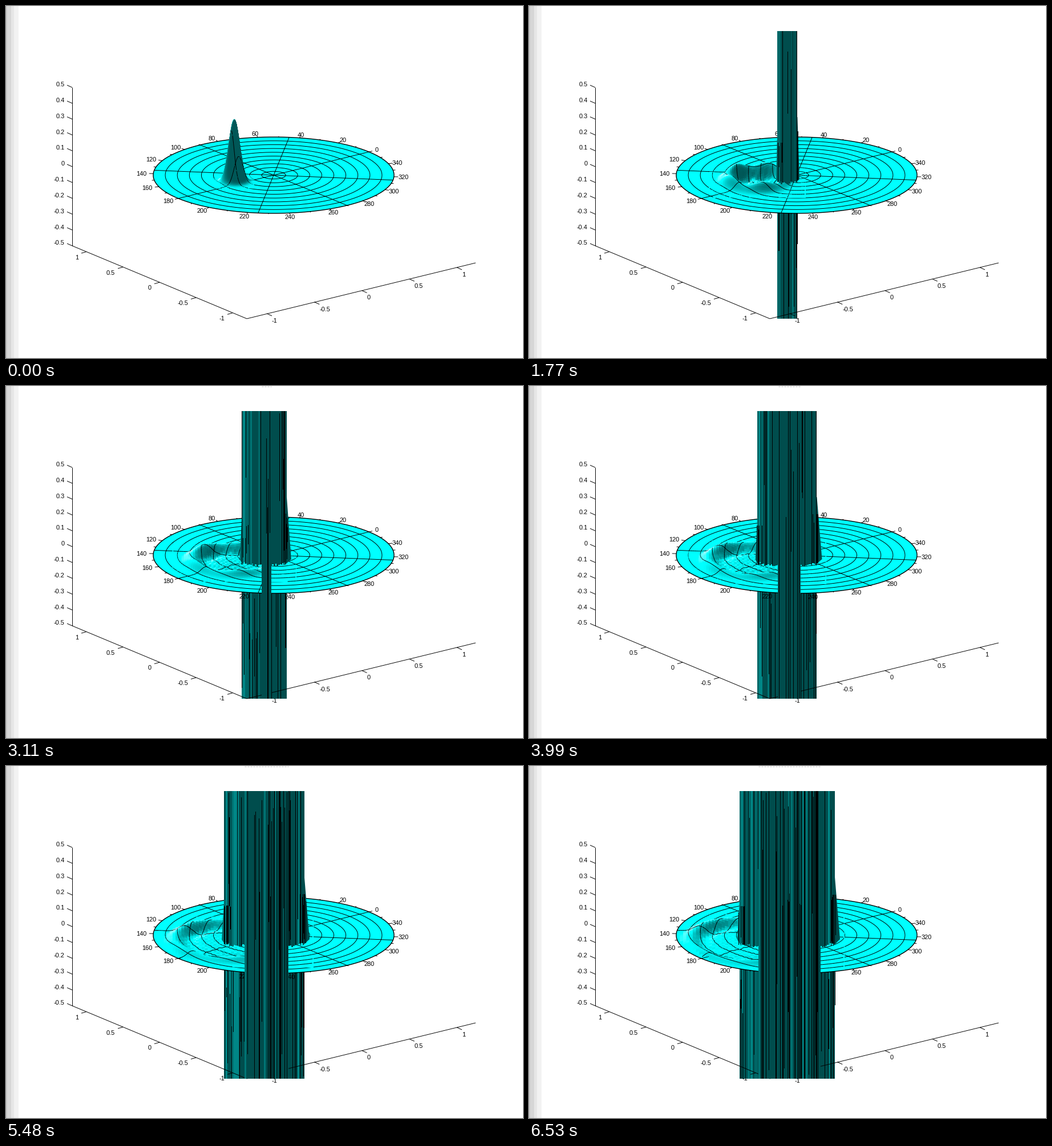
Animation, 906 px wide and 618 px high, one loop 6670 ms. Source, as a matplotlib script:

```python
import numpy as np
import matplotlib.pyplot as plt
from matplotlib.animation import FuncAnimation
from matplotlib.collections import PolyCollection

W, H = 906, 618
LOOP, FRAMES = 6670, 115
SLOT = 148.1                        # ms between simulation pictures
HELD = np.array([24, 29, 33, 35, 40, 42])   # slots repeating the picture before
PX = 0.72                           # one pixel in points

CX, CY, RX, RY = 469.0, 297.0, 211.0, 67.0  # disk on the stage
TURN = 37.6                         # view rotation in degrees
Z_SCALE = 278.0                     # pixels per unit of height
TOP, BOTTOM = 44, 549               # clip range of the column
COL_X, FRONT_X = 452.5, 456.5
PULSE_X, PULSE_Y, PULSE_W = 400.0, 309.0, 13.4
SQUASH = RY / RX

fig = plt.figure(figsize=(W / 100, H / 100), dpi=100, facecolor="white")
ax = fig.add_axes([0, 0, 1, 1])
ax.set_xlim(0, W)
ax.set_ylim(H, 0)
ax.axis("off")


def polar(r, deg):
    a = np.radians(np.asarray(deg) + TURN)
    return CX + RX * r * np.cos(a), CY - RY * r * np.sin(a)


def line(x, y, z, width=0.95):
    ax.plot(x, y, color="black", lw=width * PX, zorder=z, solid_capstyle="butt")


def label(x, y, value, z=1, ha="center"):
    ax.text(x, y + 3.8, f"{value:g}", family="Liberation Sans", fontsize=11 * PX,
            ha=ha, va="baseline", color="black", zorder=z)


def draw_page_edge():
    edges = [0, 2, 9, 14, 22]
    for x0, x1, grey in zip(edges, edges[1:], [0.79, 0.84, 0.90, 0.95]):
        ax.fill([x0, x1, x1, x0], [0, 0, H, H], color=str(grey), lw=0, zorder=0)


def draw_axes():
    line([116, 116], [143, 421], 4)
    line([116, 422], [421, 549], 4)
    line([422, 823], [549, 451], 4)
    for k in range(11):
        y = 143 + 27.8 * k
        line([116, 107], [y, y - 4], 4)
        label(102.5, y - 5.5, round(0.5 - k / 10, 1), ha="right")
    for k in range(5):
        x, y = 141 + 64 * k, 431.5 + 26.85 * k
        line([x, x - 9], [y, y + 2.5], 4)
        label(x - 14, y + 9.5, 1 - k / 2, ha="right")
        x, y = 457 + 83.25 * k, 540 - 20.25 * k
        line([x, x + 9], [y, y + 4], 4)
        label(x + 9, y + 12, k / 2 - 1, ha="left")


def draw_disk():
    around = np.linspace(0, 360, 241)
    ax.fill(*polar(1, around), color="cyan", lw=0, zorder=3)
    for k in range(1, 11):
        line(*polar(k / 10, around), 3.2, 1.4 if k == 10 else 0.95)
    for deg in range(0, 180, 45):
        line(*polar(np.array([-1, 1]), deg), 3.2)
    for deg in range(0, 360, 10):
        major = deg % 20 == 0
        line(*polar(np.array([1, 1.035 if major else 1.02]), deg), 3.4)
        if major:
            a = np.radians(deg + TURN)
            label(467 + 230 * np.cos(a), 297.3 - 73.3 * np.sin(a), deg,
                  z=3.5 if 150 < deg < 310 else 1)


def mesh_segments():
    """Short pieces of every ring and spoke, as start and end points."""
    around = np.linspace(0, 360, 181)
    paths = [np.column_stack(polar(k / 10, around)) for k in range(1, 10)]
    along = np.linspace(-0.99, 0.99, 120)
    paths += [np.column_stack(polar(along, d)) for d in range(0, 180, 45)]
    return (np.concatenate([p[:-1] for p in paths]),
            np.concatenate([p[1:] for p in paths]))


def layer(z, width=0.0):
    coll = PolyCollection([], lw=width * PX, joinstyle="bevel", zorder=z)
    ax.add_collection(coll, autolim=False)
    return coll


def paint(coll, verts, colors):
    coll.set_verts(verts)
    coll.set_color(colors)


# The pulse: a bump that opens into a spreading ring

def ring_radius(s):
    return np.interp(s, [0, 7, 16, 26, 31, 36, 38], [0, 36, 62, 86, 98, 114, 118])


def height(u, v, s):
    radius = ring_radius(s)
    amp = np.interp(s, [0, 1, 2, 4, 7, 16, 26, 38], [110, 75, 52, 30, 21, 13, 10, 8.5])
    open_ = min(1, radius / 40)
    du, dv = u - PULSE_X, (v - PULSE_Y) / SQUASH
    rho, phi = np.hypot(du, dv), np.arctan2(dv, du)
    crest = np.exp(-((rho - radius) / PULSE_W) ** 2)
    trough = np.exp(-((rho - radius + 1.8 * PULSE_W) / PULSE_W) ** 2)
    uneven = 1 + 0.25 * open_ * np.sin(5 * phi + 1)
    near = 1 - 0.3 * min(1, s / 16) * np.clip(np.sin(phi), 0, 1)
    wave = amp * (crest - 0.45 * open_ * trough) * uneven * near
    inside = 1 / (1 + np.exp(np.clip((rho - radius + 12) / 5, -30, 30)))
    ripple = 1.3 * open_ * inside * np.sin(0.42 * u + s) * np.sin(1.1 * v + 0.12 * u)
    fade = 1 / (1 + np.exp((u - 448) / 9))
    return (wave + ripple) * (fade if s > 3 else 1)


def shade(gu, gv):
    norm = np.sqrt(1 + gu ** 2 + gv ** 2)
    light = (0.35 * gu + 0.45 * gv + 0.82) / norm
    body = 0.34 + 0.66 * np.clip(light / 0.82, 0, 1) ** 1.8
    gloss = 0.75 * np.clip((light - 0.87) / 0.08, 0, 1)
    return np.stack([gloss, body, body], axis=-1)


def draw_surface(s):
    span = ring_radius(s) + 34
    u = np.linspace(PULSE_X - span, PULSE_X + span, 55)
    v = np.linspace(PULSE_Y - span * SQUASH, PULSE_Y + span * SQUASH, 57)
    step_u, step_v = u[1] - u[0], v[1] - v[0]
    uu, vv = np.meshgrid(u, v)
    hh = height(uu, vv, s)

    pts = np.stack([uu, vv - hh], axis=-1)
    quads = np.stack([pts[:-1, :-1], pts[:-1, 1:], pts[1:, 1:], pts[1:, :-1]], axis=2)
    rise_u = np.diff(hh, axis=1)
    rise_v = np.diff(hh, axis=0)
    gu = (rise_u[:-1] + rise_u[1:]) / 2 / step_u * RX / Z_SCALE
    gv = (rise_v[:, :-1] + rise_v[:, 1:]) / 2 / step_v * RY / Z_SCALE
    mid_u, mid_v = uu[:-1, :-1] + step_u / 2, vv[:-1, :-1] + step_v / 2
    keep = np.hypot((mid_u - CX) / RX, (mid_v - CY) / RY) < 0.97
    quads, colors, depth = quads[keep], shade(gu, gv)[keep], mid_v[keep]

    mid = (SEG_A + SEG_B) / 2
    near = ((abs(mid[:, 0] - PULSE_X) < span)
            & (abs(mid[:, 1] - PULSE_Y) < span * SQUASH))
    a, b = SEG_A[near].copy(), SEG_B[near].copy()
    for p in (a, b):
        p[:, 1] -= height(p[:, 0], p[:, 1], s)
    wires = np.stack([a, b, b, a], axis=1)

    # Painter's order: far rows first, each wire just after its patch
    order = np.argsort(np.concatenate([depth, mid[near, 1] + 1.2 * step_v]),
                       kind="stable")
    paint(surface, np.concatenate([quads, wires])[order],
          np.concatenate([colors, np.zeros((len(wires), 3))])[order])


# The column: an instability that outgrows the plot box

def bars(x, w, y0, y1, taper=0.0):
    x, w, y0, y1, t = np.broadcast_arrays(x, w, y0, y1, taper)
    return np.stack([np.stack([x, y0], -1), np.stack([x + w, y0], -1),
                     np.stack([x + w * (1 - t), y1], -1),
                     np.stack([x + w * t, y1], -1)], axis=1).astype(float)


def columns(mid, half, n):
    """Left edges and widths of n bars on whole pixels."""
    edges = np.round(np.linspace(mid - half, mid + half, n + 1))
    return edges[:-1], np.diff(edges)


def teal(rng, u, lit):
    bright = rng.random(len(u)) < np.where(u < -0.6, 0.65, lit)
    g = np.where(bright, rng.choice([0.4, 0.46, 0.53], len(u)), 0.3)
    return np.stack([0 * g, g, g], axis=-1)


def ink(rng, lo, hi, y0, y1, count):
    """Black upright strokes, some of them only part of the height."""
    x = np.round(rng.uniform(lo, hi - 1, count))
    a = np.where(rng.random(count) < 0.65, 0, rng.uniform(0, 0.6, count))
    b = np.where(rng.random(count) < 0.6, 1, rng.uniform(0.6, 1, count))
    return bars(x, 1, y0 + (y1 - y0) * a, y0 + (y1 - y0) * b)


def with_ink(fills, colors, strokes):
    return (np.concatenate([fills, strokes]),
            np.concatenate([colors, np.zeros((len(strokes), 3))]))


def flares(half, base):
    k = min(1, half / 45)
    left, right = COL_X - half, COL_X + half
    return np.array([
        [(right - 3, 195), (right, 195), (right + 9 * k, 304), (right - 3, base)],
        [(left + 3, 235), (left, 235), (left - 4 * k, 305), (left + 3, base)]])


def draw_column(s):
    rng = np.random.default_rng(100 + s)
    half = np.interp(s, [5, 7, 16, 26, 31, 36, 38], [3, 6.5, 27, 52, 65, 78.5, 83.5])
    amp = 145 * 3.4 ** min(s - 7, 4)
    base = 303 + 0.33 * min(half, 27) + 0.05 * half
    left, right = COL_X - half, COL_X + half

    n = max(5, int(half * 0.7))
    x, w = columns(COL_X, half, n)
    u = (x + w / 2 - COL_X) / half
    reach = amp * (1 - 0.6 * u ** 2) * rng.uniform(0.5, 1, n)
    taper = 0.35 if s < 8 else 0
    feet = base + rng.uniform(-2, 3, n) - 9 * abs(u) ** 8
    colors = teal(rng, u, 0.06)
    up = bars(x, w, feet, np.maximum(TOP, base - reach), taper)
    down = bars(x, w, 320, np.minimum(BOTTOM, 300 + reach), taper)
    down_colors = colors

    strokes = max(5, int(half * 0.42))
    span = min(0.85 * amp, base - TOP)
    up_ink = ink(rng, left, right, base, base - span, strokes)
    down_ink = ink(rng, left, right, 320, min(BOTTOM, 300 + 0.85 * amp), strokes)
    if s >= 9:
        up = np.concatenate([up, flares(half, base)])
        colors = np.concatenate([colors, [(0, 0.3, 0.3), (0, 0.42, 0.42)]])
        # Short new spikes along both rims
        rim = max(4, int(half / 7))
        up_ink = np.concatenate([
            up_ink,
            ink(rng, right - 8, right + 3, base - 4, base - 90, rim),
            ink(rng, left - 2, left + 12, base - 2, base - 70, rim)])
        down_ink = np.concatenate([
            down_ink,
            ink(rng, right - 4, right + 1, 340, 460, 2),
            ink(rng, left - 1, left + 6, 340, 430, 2)])
    paint(upper, *with_ink(up, colors, up_ink))
    paint(lower, *with_ink(down, down_colors, down_ink))


def draw_front(s):
    rng = np.random.default_rng(300 + s)
    half = np.interp(s, [18, 26, 31, 36, 38], [1, 20, 32.5, 48, 54.5])
    n = max(2, int(half * 0.7))
    x, w = columns(FRONT_X, half, n)
    lit = np.interp(s, [26, 38], [0.03, 0.2])
    fills = bars(x, w, BOTTOM, TOP)
    count = int(half * np.interp(s, [26, 38], [0.4, 0.75])) + 1
    strokes = ink(rng, FRONT_X - half, FRONT_X + half, BOTTOM, TOP, count)
    paint(front, *with_ink(fills, teal(rng, np.zeros(n), lit), strokes))
    specks.set_data([FRONT_X - half, FRONT_X + half], [0.5, 0.5])


def state_at(n):
    slot = min(44, int((n + 1) * LOOP / FRAMES / SLOT))
    return slot - int((HELD <= slot).sum())


def update(n):
    s = state_at(n)
    draw_surface(s)
    for part in (lower, upper):
        part.set_visible(s >= 5)
    for part in (front, specks):
        part.set_visible(s >= 18)
    if s >= 5:
        draw_column(s)
    if s >= 18:
        draw_front(s)
    return surface, lower, upper, front, specks


draw_page_edge()
draw_axes()
draw_disk()
SEG_A, SEG_B = mesh_segments()
lower, surface, upper, front = layer(2), layer(3.6, 0.95), layer(5), layer(6)
specks, = ax.plot([], [], color="0.8", lw=PX, ls=(0, (3, 2)), zorder=1)

anim = FuncAnimation(fig, update, frames=FRAMES, interval=LOOP // FRAMES,
                     init_func=lambda: update(0), repeat=True, repeat_delay=0,
                     blit=False)
plt.show()
```
